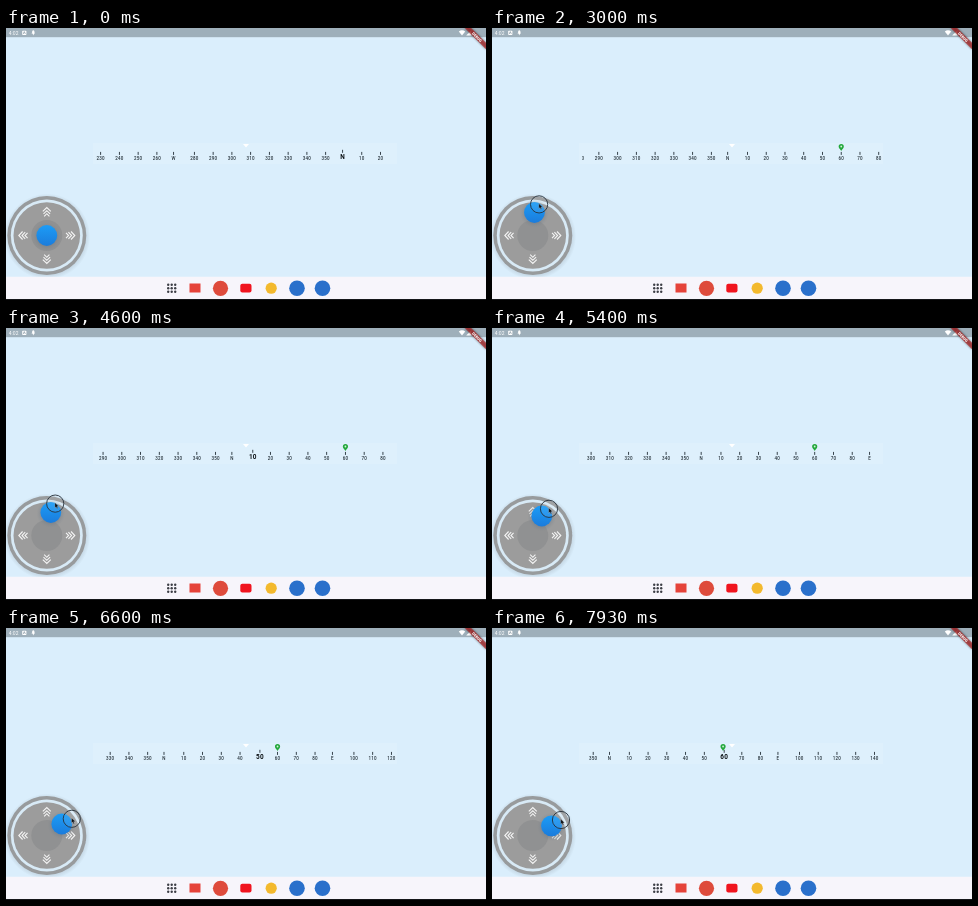
An HTML page that plays this animation: 480 by 272 pixels, repeating every 8000 ms.

```html
<!DOCTYPE html>
<html lang="en">
<head>
<meta charset="utf-8">
<title>Compass joystick</title>
<style>
html, body { margin: 0; width: 100%; height: 100%; overflow: hidden; background: #daeefc; }
svg { display: block; width: 100vw; height: 100vh; }
text { font-family: Roboto, sans-serif; }
.label { font-size: 4.5px; font-weight: 500; letter-spacing: .2px; text-anchor: middle; fill: #26323a; }
.bold { font-size: 6.4px; font-weight: 700; fill: #0a0f12; }
</style>
</head>
<body>
<svg viewBox="0 0 480 272" xmlns="http://www.w3.org/2000/svg">
  <defs>
    <clipPath id="window"><rect x="90.2" y="112" width="299.5" height="26"/></clipPath>
    <linearGradient id="blue" x1="0" y1="0" x2="0" y2="1">
      <stop offset="0" stop-color="#1c9cf6"/>
      <stop offset="1" stop-color="#1b7cdc"/>
    </linearGradient>
    <radialGradient id="halo">
      <stop offset=".6" stop-color="#5d6f80" stop-opacity=".4"/>
      <stop offset="1" stop-color="#808890" stop-opacity="0"/>
    </radialGradient>
    <radialGradient id="glow">
      <stop offset=".88" stop-color="#9aa9b4" stop-opacity=".35"/>
      <stop offset="1" stop-color="#9aa9b4" stop-opacity="0"/>
    </radialGradient>
    <filter id="blur" x="-.2" y="-1" width="1.4" height="3"><feGaussianBlur stdDeviation="3"/></filter>
    <path id="chevrons" d="M-4-24.2 0-28 4-24.2M-3.3-21.6 0-24.8 3.3-21.6M-2.6-19.2 0-21.8 2.6-19.2" fill="none" stroke="#f4f4f4" stroke-width="1.1"/>
  </defs>

  <rect width="480" height="272" fill="#daeefc"/>

  <!-- status bar -->
  <rect width="480" height="9.2" fill="#9eafba"/>
  <g fill="#fff">
    <text x="2.8" y="6.9" font-size="5">4:02</text>
    <rect x="16.2" y="2.7" width="4.2" height="4.2" rx=".7"/>
    <path d="M27.3 2.3a1.2 1.2 0 0 1 1 1.8l.8 1.3h-1l-.8 2-.8-2h-1l.8-1.3a1.2 1.2 0 0 1 1-1.8z"/>
    <path d="M452.8 3.4q3.2-2.4 6.4 0L456 7.6z"/>
    <path d="M460.2 7.4h5.2V2.2z"/>
  </g>
  <path d="M17.3 5.9l1-2.3 1 2.3" fill="none" stroke="#7d8f9b" stroke-width=".7"/>

  <!-- corner banner -->
  <g transform="translate(480 0) rotate(45) scale(.375)">
    <rect x="-40" y="28" width="80" height="12" opacity=".5" filter="url(#blur)"/>
    <rect x="-42" y="28" width="84" height="12" fill="#b71c1c" opacity=".65"/>
    <text y="37.6" font-size="10.2" font-weight="900" text-anchor="middle" fill="#fff">DEBUG</text>
  </g>

  <!-- compass ruler -->
  <rect x="87" y="115" width="304" height="21" fill="#fff" opacity=".1"/>
  <g id="ruler" clip-path="url(#window)"></g>
  <path d="M237 116h6l-3 3.6z" fill="#fff"/>

  <!-- joystick -->
  <circle cx="41.2" cy="208.5" r="43" fill="url(#glow)"/>
  <g transform="translate(40.8 207.5)">
    <circle r="39.5" fill="#989b9d"/>
    <circle r="36" fill="#d8eaf6"/>
    <circle r="33.3" fill="#9c9c9c"/>
    <circle r="15.5" fill="#909192"/>
    <use href="#chevrons"/>
    <use href="#chevrons" transform="rotate(90)"/>
    <use href="#chevrons" transform="rotate(180)"/>
    <use href="#chevrons" transform="rotate(270)"/>
    <g id="knob">
      <circle r="14.5" cy="1" fill="url(#halo)"/>
      <circle r="10.4" fill="url(#blue)"/>
    </g>
  </g>

  <!-- taskbar -->
  <rect y="248.8" width="480" height="22.4" fill="#f7f5fb"/>
  <rect y="271" width="480" height="1" fill="#15171a"/>
  <g id="dots" fill="#3c3e45"></g>
  <rect x="183.5" y="255.5" width="11" height="9" fill="#e5433a"/>
  <circle cx="214.5" cy="260.3" r="7.6" fill="#de4b3c"/>
  <rect x="234.3" y="255.8" width="11.2" height="8.6" rx="2" fill="#f0141e"/>
  <circle cx="265.2" cy="260.2" r="5.6" fill="#f3b92d"/>
  <circle cx="291" cy="260.3" r="7.8" fill="#2a70cb"/>
  <circle cx="316.5" cy="260.3" r="7.8" fill="#2a70cb"/>

  <!-- pointer -->
  <g id="pointer">
    <circle id="touch" r="8.6" fill="#fff" fill-opacity=".08" stroke="#27323b" stroke-width=".9"/>
    <path d="M-.3-.9v5.2l1.2-1.1.9 1.9.9-.4-.9-1.8 1.7-.1z" fill="#0b0d10" stroke="#d9e6f0" stroke-width=".25"/>
  </g>
</svg>
<script>
const LOOP = 8000, STEP = 18.75, MARK = 240;
const $ = id => document.getElementById(id);
const ease = u => u * u * (3 - 2 * u);

function add(parent, tag, attrs) {
  const el = document.createElementNS('http://www.w3.org/2000/svg', tag);
  for (const k in attrs) el.setAttribute(k, attrs[k]);
  parent.append(el);
  return el;
}

// keys: [time, ...values]
const headingKeys = [[2500, -52.4], [2960, 1], [3600, 2.3], [4600, 6.3], [5400, 15.2], [6600, 42.5], [7930, 64.1]];
const knobKeys = [[2430, 0, 0], [2900, 1.6, -23], [3600, 2, -23], [4600, 4, -23], [5400, 9, -19.5], [6600, 15, -11.5], [7930, 18.7, -9.7]];
const pointerKeys = [[1870, 49, 213], [2200, 45.6, 206.8], [2430, 45.6, 206.8], [2900, 47, 176.5], [3600, 47.7, 175.6], [4600, 49.2, 175.6], [5400, 57, 180.8], [6600, 65.8, 190.8], [7930, 69, 192]];

function at(keys, t) {
  if (t <= keys[0][0]) return keys[0].slice(1);
  const i = keys.findIndex(k => k[0] > t);
  if (i < 0) return keys[keys.length - 1].slice(1);
  const a = keys[i - 1], b = keys[i];
  let u = (t - a[0]) / (b[0] - a[0]);
  if (b[0] < 3000) u = ease(u);
  return a.slice(1).map((v, j) => v + (b[j + 1] - v) * u);
}

for (let i = 0; i < 9; i++)
  add($('dots'), 'circle', { cx: 162.2 + i % 3 * 3.5, cy: 256.8 + Math.floor(i / 3) * 3.5, r: 1.2 });

const compass = { 0: 'N', 90: 'E', 180: 'S', 270: 'W' };
const marks = [];
for (let deg = -140; deg <= 160; deg += 10) {
  const value = (deg + 360) % 360;
  const g = add($('ruler'), 'g', {});
  const tick = add(g, 'rect', { width: .9, height: 3, fill: '#26323a' });
  const text = add(g, 'text', {});
  text.textContent = compass[value] || value;
  const widths = ['label', 'label bold'].map(c => {
    text.setAttribute('class', c);
    return text.getComputedTextLength();
  });
  marks.push({ deg, g, tick, text, widths });
}
const pin = add($('ruler'), 'g', {});
add(pin, 'path', { d: 'M0 123C-.9 121.5-2.6 120.3-2.6 118.6a2.6 2.6 0 0 1 5.2 0C2.6 120.3.9 121.5 0 123z', fill: '#23a83c' });
add(pin, 'circle', { cy: 118.5, r: .9, fill: '#d5f1dc' });

function draw(t) {
  const [heading] = at(headingKeys, t);
  const [dx, dy] = at(knobKeys, t);
  const [px, py] = at(pointerKeys, t);
  const aim = Math.atan2(dx, 0 - dy) * 180 / Math.PI;

  for (const m of marks) {
    const bold = Math.abs(m.deg - aim) < 3;
    const left = MARK + (m.deg - heading) * STEP / 10 - 4;
    const mid = m.widths[+bold] / 2;
    m.g.setAttribute('transform', `translate(${left} 0)`);
    m.text.setAttribute('class', bold ? 'label bold' : 'label');
    m.text.setAttribute('x', mid);
    m.text.setAttribute('y', bold ? 131.4 : 131.9);
    m.tick.setAttribute('x', mid - .45);
    m.tick.setAttribute('y', bold ? 121.8 : 123.9);
    if (m.deg === 60) pin.setAttribute('transform', `translate(${left + m.widths[0] / 2} 0)`);
  }

  $('knob').setAttribute('transform', `translate(${dx} ${dy})`);
  $('pointer').setAttribute('transform', `translate(${px} ${py})`);
  $('pointer').setAttribute('visibility', t < 1870 ? 'hidden' : 'visible');
  $('touch').setAttribute('opacity', t < 2400 ? 0 : 1);
}

function frame() {
  draw(performance.now() % LOOP);
  requestAnimationFrame(frame);
}
frame();
</script>
</body>
</html>
```
